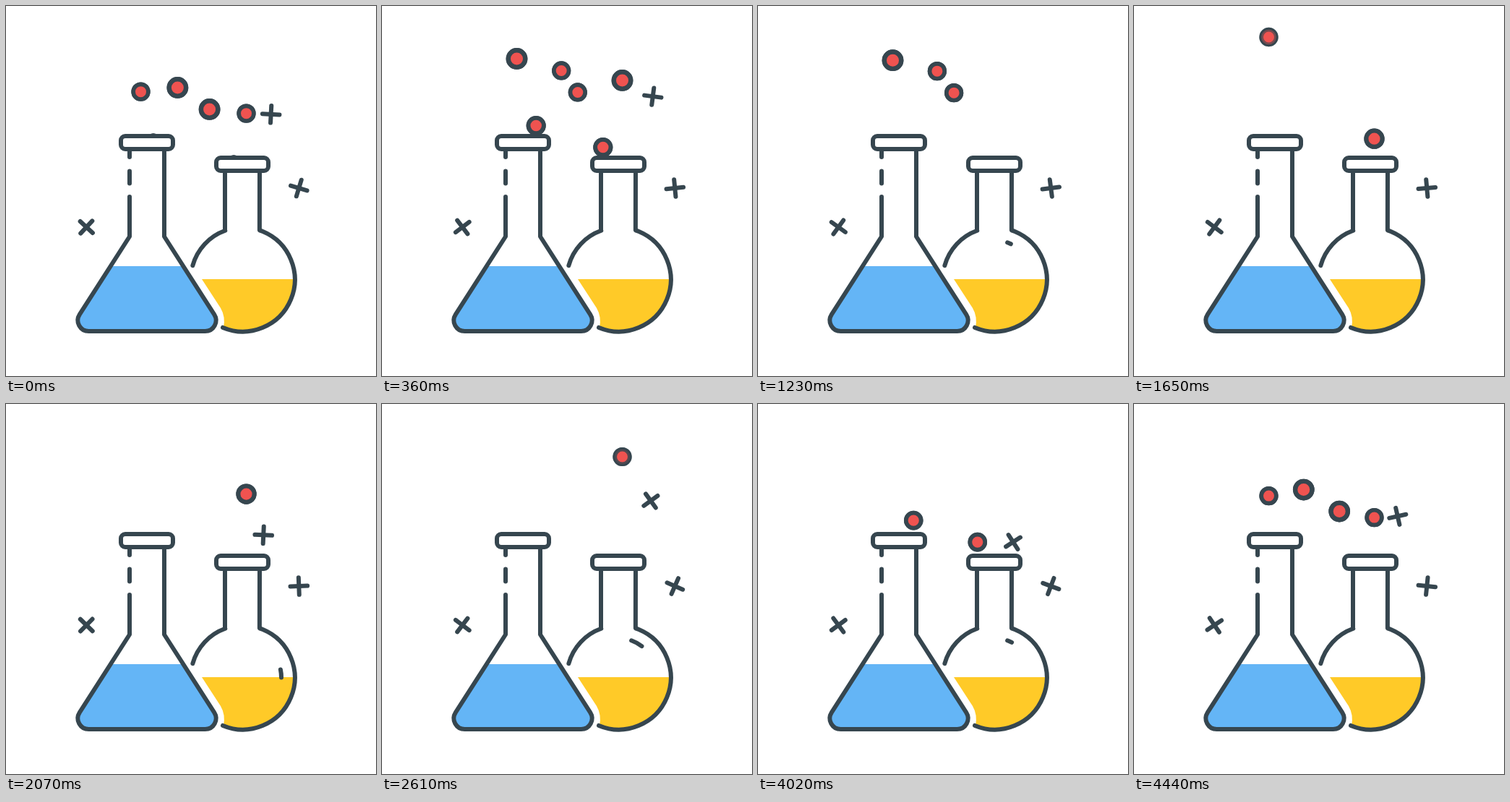
An HTML page with a canvas that plays this animation: 512 by 512 pixels, repeating every 4470 ms.

```html
<!DOCTYPE html>
<html lang="en">
<head>
<meta charset="utf-8">
<title>Flasks</title>
<style>
html, body { margin: 0; width: 100%; height: 100%; overflow: hidden; background: #fff; }
canvas { display: block; width: 100vmin; height: 100vmin; }
</style>
</head>
<body>
<canvas id="stage" width="512" height="512"></canvas>
<script>
const ctx = document.getElementById('stage').getContext('2d');
const LOOP = 4470, STEP = 30, CYCLE = 4500;
const INK = '#36464f', BLUE = '#64b5f6', YELLOW = '#ffca28', RED = '#ef5350';
const TURN = Math.PI * 2, RAD = Math.PI / 180;

const clamp = u => Math.min(1, Math.max(0, u));
const easeInOut = u => (1 - Math.cos(Math.PI * clamp(u))) / 2;
const easeOut = u => 1 - (1 - clamp(u)) ** 1.3;

// Each motion runs from start to end around the delay of its wave.
const COLUMN = { start: -440, end: 706, fade: 690, from: 185, to: 43, ease: easeOut, peak: 350, x: () => 186.5 };
const DIAGONAL = { start: -990, end: 510, fade: 400, from: 187, to: 87, ease: easeInOut, peak: -20, x: y => 230 + (129 - y) * 0.46 };
const FLYER = { start: -765, end: 525, from: 200, to: 122, ease: easeInOut };

const localTime = (motion, t, delay) =>
  ((t - delay - motion.start) % CYCLE + CYCLE) % CYCLE + motion.start;

function height({ start, end, from, to, ease }, t) {
  return from + (to - from) * ease((t - start) / (end - start));
}

function stroke(build) {
  ctx.beginPath();
  build();
  ctx.stroke();
}

function line(x1, y1, x2, y2) {
  stroke(() => { ctx.moveTo(x1, y1); ctx.lineTo(x2, y2); });
}

function disc(x, y, r, color) {
  ctx.fillStyle = color;
  ctx.beginPath();
  ctx.arc(x, y, r, 0, TURN);
  ctx.fill();
}

// As the ring fades, the red below shows through its inner half.
function dot(x, y, r, ring) {
  const k = r / 14;
  disc(x, y, r, INK);
  disc(x, y, 11 * k, RED);
  ctx.save();
  ctx.globalAlpha = ring;
  ctx.lineWidth = 6 * k;
  stroke(() => ctx.arc(x, y, 11 * k, 0, TURN));
  ctx.restore();
}

function bubble(motion, t, delay, right) {
  const local = localTime(motion, t, delay);
  const ring = 1 - clamp((local - motion.fade) / 200);
  if (ring < 0.5) return;
  const y = height(motion, local), x = motion.x(y);
  const pulse = 14 + 0.9 * Math.cos(TURN * (local - motion.peak) / 760);
  const r = pulse * clamp((local - motion.start) / 150);
  if (right) dot(519 - x, y + 30, r, ring);
  else dot(x, y, r, ring);
}

function bubbles(t) {
  for (const right of [false, true]) {
    for (const delay of [0, 890]) bubble(DIAGONAL, t, delay, right);
    for (const delay of [0, right ? 1890 : 890]) bubble(COLUMN, t, delay, right);
  }
}

function cross(x, y, angle, scale = 1) {
  ctx.save();
  ctx.translate(x, y);
  ctx.rotate(angle * RAD);
  ctx.scale(scale, scale);
  line(-11.8, 0, 11.8, 0);
  line(0, -11.8, 0, 11.8);
  ctx.restore();
}

function flyingCross(t, delay) {
  const local = localTime(FLYER, t, delay);
  if (local >= FLYER.end) return;
  const y = height(FLYER, local);
  const scale = clamp((local - FLYER.start) / 150) * clamp((FLYER.end - local) / 120);
  if (scale > 0) cross(356 + (182 - y) * 0.33, y, 93 + 0.262 * local, scale);
}

// Two and a half turns per cycle, with a slow sway in speed.
function spinningCrosses(t) {
  const phase = TURN * t / CYCLE, spin = 900 * t / CYCLE;
  const lag = 1 - Math.cos(phase), sway = Math.sin(phase);
  cross(111.3, 306, 43 - spin - 16 * lag - 13 * sway);
  cross(405.3, 252, 17 + spin + 10 * lag - 12 * sway);
}

function lip(x, y) {
  ctx.fillStyle = '#fff';
  ctx.beginPath();
  ctx.roundRect(x, y, 72, 18, 6);
  ctx.fill();
  ctx.stroke();
}

function roundFlask() {
  const cx = 327.7, cy = 378.5, r = 72;
  const at = (x, y) => Math.atan2(y - cy, x - cx);
  ctx.fillStyle = YELLOW;
  ctx.beginPath();
  ctx.moveTo(271, 378);
  ctx.lineTo(297, 418);
  ctx.quadraticCurveTo(304, 430, 301, 445);
  ctx.arc(cx, cy, r, at(300, 445), 0, true);
  ctx.lineTo(399, 378);
  ctx.fill();
  stroke(() => {
    ctx.arc(cx, cy, r, at(300, 445), at(351, 310), true);
    ctx.lineTo(351, 229);
  });
  stroke(() => {
    ctx.moveTo(303, 229);
    ctx.lineTo(303, 310);
    ctx.arc(cx, cy, r, at(303, 310), at(258, 359), true);
  });
  lip(291, 210);
}

function coneBody() {
  ctx.lineTo(171, 319);
  ctx.arcTo(87, 450, 195, 450, 15);
  ctx.arcTo(303, 450, 219, 319, 15);
  ctx.lineTo(219, 319);
}

function coneFlask() {
  ctx.save();
  ctx.beginPath();
  coneBody();
  ctx.clip();
  ctx.fillStyle = BLUE;
  ctx.fillRect(90, 360, 210, 95);
  ctx.restore();
  stroke(() => {
    ctx.moveTo(171, 264);
    coneBody();
    ctx.lineTo(219, 199);
  });
  line(171, 199, 171, 209);
  line(171, 228.5, 171, 245.5);
  lip(159, 180);
}

// An arc sweeps up the glass; its tail follows its head.
function glint(t) {
  for (const start of [455, 1920, 3258]) {
    const head = easeInOut((t - start) / 560);
    const tail = easeInOut((t - start - 315) / 560);
    if (head > tail) {
      stroke(() => ctx.arc(326.5, 378.5, 54.5, -70 * head * RAD, -70 * tail * RAD));
    }
  }
}

function draw(t) {
  ctx.fillStyle = '#fff';
  ctx.fillRect(0, 0, 512, 512);
  ctx.strokeStyle = INK;
  ctx.lineWidth = 6;
  ctx.lineCap = ctx.lineJoin = 'round';
  bubbles(t);
  for (const delay of [0, 2415]) flyingCross(t, delay);
  roundFlask();
  coneFlask();
  glint(t);
  spinningCrosses(t);
}

const began = performance.now();
function tick() {
  const t = (performance.now() - began) % LOOP;
  draw(Math.floor(t / STEP) * STEP);
  requestAnimationFrame(tick);
}
tick();
</script>
</body>
</html>
```
